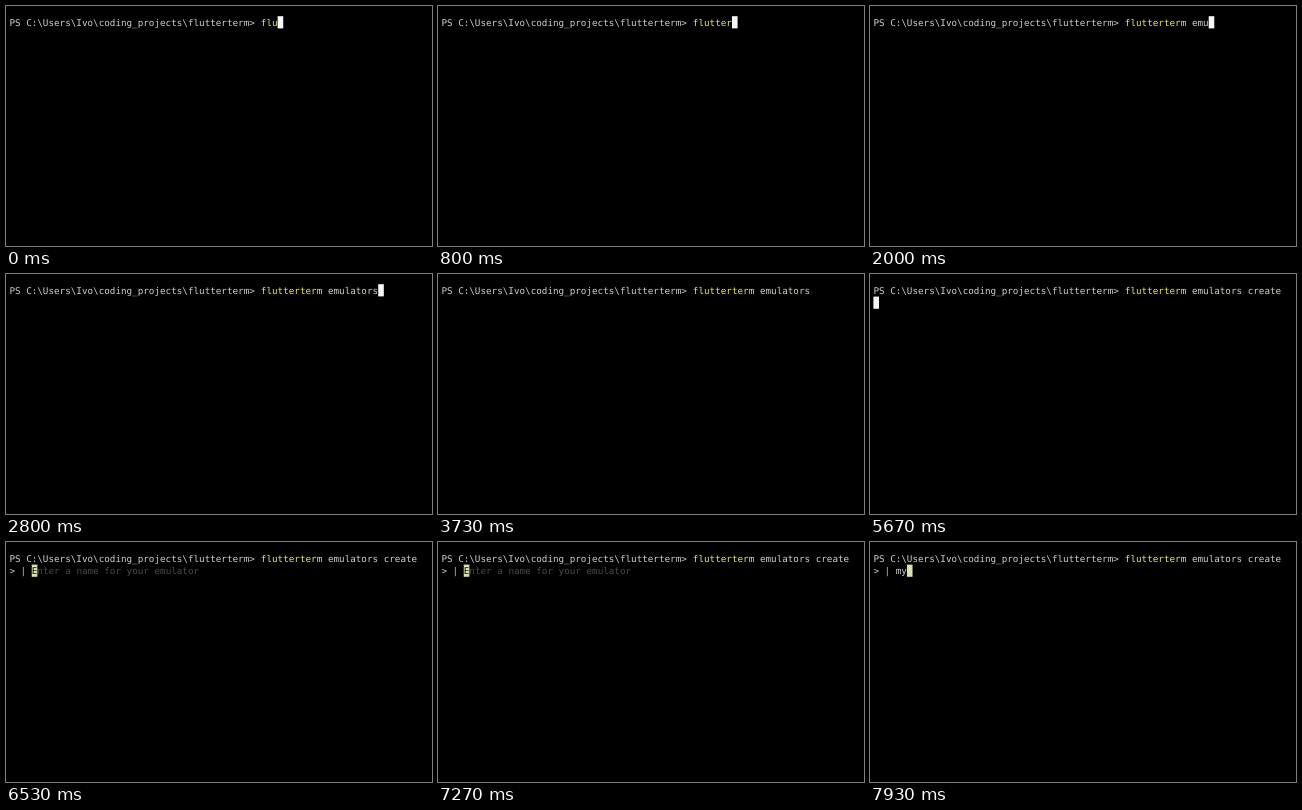
An HTML page for the animation above (8000 ms loop, 426x240 px).

```html
<!DOCTYPE html>
<html lang="en">
<head>
<meta charset="utf-8">
<title>Terminal session</title>
<style>
  html, body { margin: 0; width: 100%; height: 100%; overflow: hidden; background: #000; }
  svg { display: block; width: 100vw; height: 100vh; }
  text {
    font: 9.28px "DejaVu Sans Mono", monospace;
    text-rendering: geometricPrecision;
    white-space: pre;
    fill: #cfcfcb;
  }
  #command { fill: #efe66c; }
  #args { fill: #d3d3c3; }
  #bar { fill: #d6c765; }
  #hint { fill: #4b4b46; }
  #under { fill: #151510; }
</style>
</head>
<body>
<svg viewBox="0 0 426 240">
  <rect width="426" height="240" fill="#000"/>
  <text id="prompt"></text>
  <text id="command"></text>
  <text id="args"></text>
  <text id="arrow"></text>
  <text id="bar"></text>
  <text id="hint"></text>
  <text id="answer"></text>
  <rect id="cursor" width="5.6" height="12.2"/>
  <text id="under"></text>
</svg>
<script>
const LOOP = 8000, BLINK = 530;
const LEFT = 3.4, COLUMN = 5.588, LINE = 12.4;
const PROMPT = 'PS C:\\Users\\Ivo\\coding_projects\\flutterterm> ';
const COMMAND = 'flutterterm emulators create';
const HINT = 'Enter a name for your emulator';
const NAME = 'my';
const FIRST_WORD = 11, ANSWER_COLUMN = 4;

// Each time adds one character after the three already typed.
const KEYS = [
  200, 400, 600, 730, 930, 1070, 1200, 1330, 1470, 1600, 1730, 1870, 2130,
  2270, 2400, 2530, 2670, 2800, 4000, 4130, 4400, 4470, 4600, 4670, 4800
];
const ENTER = 5530, ASK = 6030;
const NAME_KEYS = [7600, 7800];
const EVENTS = [0, ...KEYS, ENTER, ASK, ...NAME_KEYS];

const el = id => document.getElementById(id);
const columnX = column => LEFT + column * COLUMN;
const countUntil = (times, t) => times.filter(time => time <= t).length;

function write(id, string, column, row) {
  const node = el(id);
  node.setAttribute('x', columnX(column));
  node.setAttribute('y', 19.9 + row * LINE);
  node.textContent = string;
}

function placeCursor(column, row, color, visible) {
  const cursor = el('cursor');
  cursor.setAttribute('x', columnX(column));
  cursor.setAttribute('y', 10.2 + row * LINE);
  cursor.setAttribute('fill', color);
  cursor.setAttribute('visibility', visible ? 'visible' : 'hidden');
}

function render(t) {
  const typed = COMMAND.slice(0, 3 + countUntil(KEYS, t));
  const name = NAME.slice(0, countUntil(NAME_KEYS, t));
  const asking = t >= ASK;
  const empty = asking && !name;
  const lastEvent = EVENTS[countUntil(EVENTS, t) - 1];
  const lit = Math.floor((t - lastEvent) / BLINK) % 2 === 0;

  write('command', typed.slice(0, FIRST_WORD), PROMPT.length, 0);
  write('args', typed.slice(FIRST_WORD), PROMPT.length + FIRST_WORD, 0);
  write('arrow', asking ? '>' : '', 0, 1);
  write('bar', asking ? '|' : '', 2, 1);
  write('hint', empty ? HINT : '', ANSWER_COLUMN, 1);
  write('answer', name, ANSWER_COLUMN, 1);
  write('under', empty && lit ? HINT[0] : '', ANSWER_COLUMN, 1);

  if (asking) placeCursor(ANSWER_COLUMN + name.length, 1, '#dedeb8', lit);
  else if (t >= ENTER) placeCursor(0, 1, '#f4f4f0', lit);
  else placeCursor(PROMPT.length + typed.length, 0, '#f8f8f8', lit);
}

write('prompt', PROMPT, 0, 0);
render(0);
const start = performance.now();
function tick() {
  render((performance.now() - start) % LOOP);
  requestAnimationFrame(tick);
}
requestAnimationFrame(tick);
</script>
</body>
</html>
```
